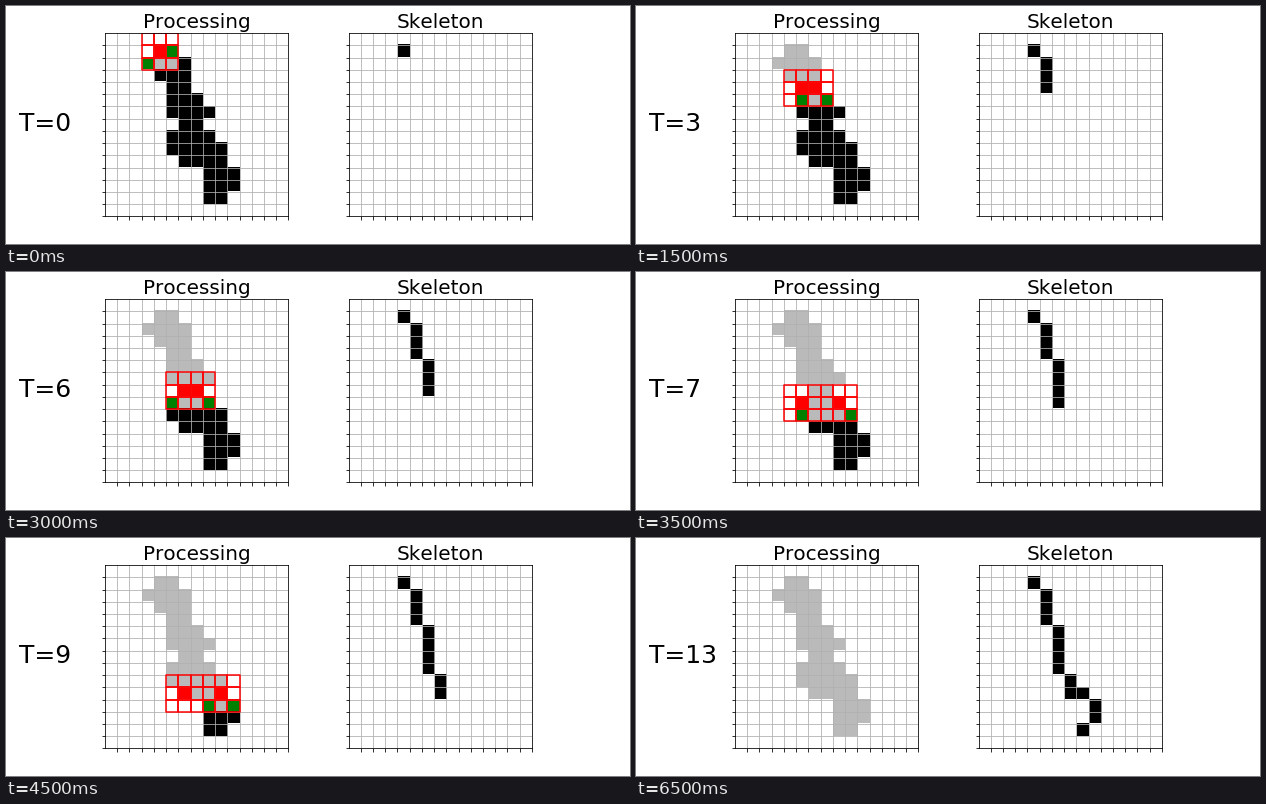
Animation, 624 px wide and 238 px high, one loop 7000 ms. Source, as a matplotlib script:

```python
import matplotlib.pyplot as plt
import numpy as np
from matplotlib.animation import FuncAnimation
from matplotlib.collections import PolyCollection

W, H, DPI = 624, 238, 72
N, CELL = 15, 12.225
TOP, LEFTS = 27.08, (99.04, 342.54)
STEPS, STEP_MS = 14, 500

# first and last filled column of each row, from row 1 down
SPANS = [(4, 5), (3, 6), (4, 6), (5, 6), (5, 7), (5, 8), (6, 7),
         (5, 8), (5, 9), (6, 9), (8, 10), (8, 10), (8, 9)]
WHITE, BLACK = (255, 255, 255), (0, 0, 0)
GRAY, RED, GREEN = (186, 186, 186), (255, 0, 0), (0, 128, 0)


def link(a, b):
    """Cells on the straight line from a to b."""
    n = max(abs(b[0] - a[0]), abs(b[1] - a[1]), 1)
    return [tuple(round(p + (q - p) * i / n) for p, q in zip(a, b))
            for i in range(n + 1)]


def trace():
    """Walk the two wave ends down the shape, recording every step."""
    shape = {(r, c) for r, (a, b) in enumerate(SPANS, 1)
             for c in range(a, b + 1)}
    ends, seen, bones = [(1, 4)], set(), []
    steps = []
    for _ in range(STEPS):
        seen = seen | set(ends)
        box, nxt = None, []
        if ends:
            rows, cols = zip(*ends)
            box = (min(rows) - 1, max(rows) + 1,
                   min(cols) - 1, max(cols) + 1)
            found = sorted((p for p in shape - seen
                            if box[0] <= p[0] <= box[1]
                            and box[2] <= p[1] <= box[3]),
                           key=lambda p: p[0] - p[1])
            if found:
                nxt = [found[0], found[-1]]
            seen = seen | set(found)
            mid = ((rows[0] + rows[-1]) // 2, (cols[0] + cols[-1]) // 2)
            bones = bones + link(bones[-1] if bones else mid, mid)
        steps.append((shape, seen, ends, nxt, box, bones))
        ends = nxt
    return steps


def paint(*layers):
    img = np.full((N, N, 3), WHITE, dtype=np.uint8)
    for cells, color in layers:
        for r, c in cells:
            img[r, c] = color
    return img


def squares(box):
    """Outline of every cell in the box."""
    if box is None:
        return []
    r0, r1, c0, c1 = box
    unit = np.array([(-.5, -.5), (.5, -.5), (.5, .5), (-.5, .5)])
    return [unit + (c, r) for r in range(r0, r1 + 1)
            for c in range(c0, c1 + 1)]


def panel(left, title):
    size = N * CELL
    ax = fig.add_axes([left / W, 1 - (TOP + size) / H, size / W, size / H])
    im = ax.imshow(paint(), interpolation="nearest", aspect="auto")
    ticks = np.arange(.5, N)
    ax.set_xticks(ticks)
    ax.set_yticks(ticks)
    ax.set_xlim(-.5, N - .5)
    ax.set_ylim(N - .5, -.5)
    ax.tick_params(labelbottom=False, labelleft=False)
    ax.grid(True, color="#b0b0b0", lw=.8)
    ax.set_title(title, fontsize=20, pad=5)
    return ax, im


plt.rcParams["font.family"] = "DejaVu Sans"
plt.rcParams["text.kerning_factor"] = 6  # whole-pixel kerning
fig = plt.figure(figsize=(W / DPI, H / DPI), dpi=DPI, facecolor="white")
ax, work = panel(LEFTS[0], "Processing")
_, skeleton = panel(LEFTS[1], "Skeleton")
window = PolyCollection([], facecolors="none", edgecolors="red",
                        linewidths=1.5, zorder=2, snap=True)
ax.add_collection(window, autolim=False)
label = fig.text(13 / W, 1 - 125 / H, "", fontsize=25, va="baseline")
steps = trace()


def draw(t):
    shape, seen, ends, nxt, box, bones = steps[t]
    work.set_data(paint((shape, BLACK), (seen, GRAY),
                        (ends, RED), (nxt, GREEN)))
    skeleton.set_data(paint((bones, BLACK)))
    window.set_verts(squares(box))
    label.set_text(f"T={t}")
    return work, skeleton, window, label


anim = FuncAnimation(fig, draw, frames=STEPS, interval=STEP_MS,
                     repeat=True, repeat_delay=0, blit=False)
plt.show()
```
